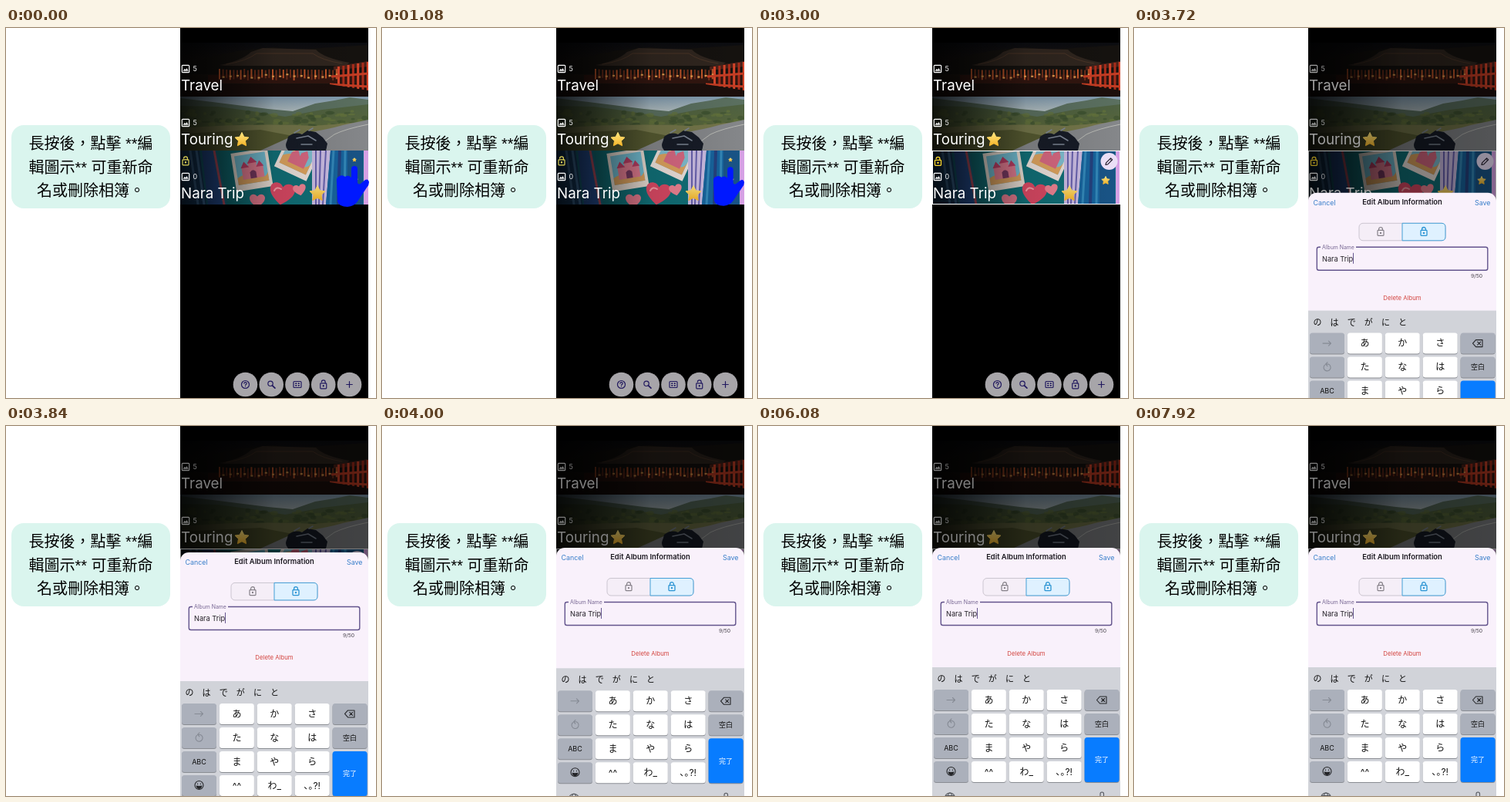
Write an HTML page that moves like this. It is 480 px wide and 480 px high and loops after 8000 ms.

```html
<!DOCTYPE html>
<html lang="zh-Hant">
<head>
<meta charset="utf-8">
<title>Album editing guide</title>
<style>
  html, body { margin: 0; width: 100%; height: 100%; overflow: hidden; background: #fff; }
  svg { display: block; width: 100vw; height: 100vh; }
  text { font-family: Inter, 'Noto Sans CJK JP', sans-serif; }
  .tip { font: 500 20px 'Liberation Sans', 'Noto Sans CJK JP', sans-serif; text-anchor: middle; }
  .mid { text-anchor: middle; }
  .line { fill: none; stroke-linecap: round; stroke-linejoin: round; }
</style>
</head>
<body>
<svg viewBox="0 0 480 480" xmlns="http://www.w3.org/2000/svg">
  <defs>
    <linearGradient id="shade"><stop offset="0" stop-opacity=".82"/><stop offset=".16" stop-opacity=".62"/><stop offset=".5" stop-opacity=".12"/><stop offset="1" stop-opacity="0"/></linearGradient>
    <linearGradient id="night" x2="0" y2="1"><stop offset="0" stop-color="#0b0c10"/><stop offset=".55" stop-color="#211812"/><stop offset="1" stop-color="#120c0a"/></linearGradient>
    <linearGradient id="sky" x2="0" y2="1"><stop offset="0" stop-color="#7f99ad"/><stop offset=".35" stop-color="#c3cbc8"/></linearGradient>
    <linearGradient id="hill" x2="0" y2="1"><stop offset="0" stop-color="#4e6142"/><stop offset="1" stop-color="#626b33"/></linearGradient>
    <linearGradient id="gold" x2="0" y2="1"><stop offset="0" stop-color="#ffe680"/><stop offset="1" stop-color="#f5b52a"/></linearGradient>
    <clipPath id="phone"><rect x="226" width="244" height="480"/></clipPath>
    <clipPath id="c1"><rect x="226" y="19" width="244" height="70"/></clipPath>
    <clipPath id="c2"><rect x="226" y="89" width="244" height="70"/></clipPath>
    <clipPath id="c3"><rect x="226" y="159" width="244" height="70"/></clipPath>
    <path id="heart" d="M0 10C-7 5-12 0-11-5C-10-10-3-11 0-6C3-11 10-10 11-5C12 0 7 5 0 10Z"/>
    <g id="pic" class="line" stroke="#fff" stroke-width="1.2"><rect x="-4.7" y="-4.7" width="9.4" height="9.4" rx="1"/><path d="M-3 2.6L-1.2 .2L.2 1.6L1.6-.6L3.2 2.6Z" fill="#fff" stroke-width=".5"/></g>
    <g id="lock" class="line"><rect x="-4" y="-1.7" width="8" height="7" rx=".8"/><path d="M-2.4-1.7V-3.2A2.4 2.4 0 0 1 2.4-3.2V-1.7"/><circle cy="1.8" r=".6"/></g>
    <g id="unlock" class="line"><rect x="-4" y="-1.7" width="8" height="7" rx=".8"/><path d="M2.4-1.7V-3.2A2.4 2.4 0 0 0-2.4-3.4"/><circle cy="1.8" r=".6"/></g>
  </defs>

  <rect x="7" y="126" width="206" height="108" rx="16" fill="#daf5ee"/>
  <text class="tip" x="110" y="157">長按後，點擊 **編</text>
  <text class="tip" x="110" y="187.5">輯圖示** 可重新命</text>
  <text class="tip" x="110" y="218">名或刪除相簿。</text>

  <g clip-path="url(#phone)">
    <rect x="226" width="244" height="480"/>

    <g clip-path="url(#c1)">
      <rect x="226" y="19" width="244" height="70" fill="url(#night)"/>
      <path d="M226 52L262 38L300 30L345 25L380 28L470 22V60H226Z" fill="#15120f"/>
      <path d="M277 48Q305 43 318 31L333 26L402 28Q412 39 446 45L440 49H284Z" fill="#30261f"/>
      <path d="M286 47Q312 43 325 33H398Q410 42 436 46" class="line" stroke="#4a3527"/>
      <path d="M262 61H470V72H262Z" fill="#321610"/>
      <path d="M425 50L470 43V50L425 55Z" fill="#4b2119"/>
      <g id="shrine"></g>
      <path d="M226 73H420L470 81V89H226Z" fill="#1c0f0c"/>
    </g>

    <g clip-path="url(#c2)">
      <rect x="226" y="89" width="244" height="70" fill="url(#sky)"/>
      <path d="M226 91L268 96L300 100L340 105L372 108L401 98L426 94L446 90L470 93V140H226Z" fill="#5b7060"/>
      <path d="M226 101L275 102L320 108L362 115L410 106L470 99V159H226Z" fill="url(#hill)"/>
      <g id="trees"></g>
      <path d="M226 130Q320 123 400 127L470 121V159H226Z" fill="#74764a"/>
      <path d="M470 119L437 126Q420 131 390 136L300 159H470Z" fill="#85878a"/>
      <path d="M470 125Q440 131 426 138L397 159" class="line" stroke="#b9bab5"/>
      <path d="M226 137L330 132L372 140L330 159H226Z" fill="#565a31"/>
      <g fill="#171c27"><path d="M366 141Q375 134 384 138L391 133L402 135L411 142L417 150L415 159H366L364 149Z"/><circle cx="371" cy="152" r="8"/><circle cx="409" cy="153" r="7"/></g>
      <path d="M374 136L381 132M393 133L398 130M377 143L392 140L402 146M383 151H397" class="line" stroke="#7e8795" stroke-width="1.5"/>
    </g>

    <g clip-path="url(#c3)">
      <rect x="226" y="159" width="244" height="70" fill="#176e86"/>
      <path d="M226 159H251L260 229H226Z" fill="#1d4a77"/>
      <path d="M239 159L249 229M247 159L257 229" class="line" stroke="#4d86bd" stroke-width="3"/>
      <path d="M254 159H268L281 229H262Z" fill="#28549d"/>
      <path d="M270 159L283 229" class="line" stroke="#c35268" stroke-width="3"/>
      <path d="M274 159H402L405 229H287Z" fill="#117078"/>
      <g transform="translate(319 184) rotate(-9)">
        <rect x="-24" y="-25" width="48" height="50" fill="#eadfd5"/><rect x="-20" y="-21" width="40" height="38" fill="#74bfd4"/>
        <path d="M-20 8Q-8 1 4 8T20 6V17H-20Z" fill="#dda35f"/>
        <path d="M-13 11V-5L-9-11L-4-5V-9L1-15L7-9V-4L11-10L15-4V11Z" fill="#e47d92"/>
        <path d="M-14-4L-9-12L-3-4ZM-5-9L1-17L8-9ZM6-3L11-11L16-3Z" fill="#bd3f66"/><path d="M-3 11V3Q1-2 5 3V11Z" fill="#793a62"/>
      </g>
      <g transform="translate(378 169) rotate(25)">
        <rect x="-23" y="-23" width="46" height="45" fill="#eee3dd"/><rect x="-19" y="-19" width="38" height="34" fill="#80bed0"/>
        <path d="M-19 4Q-6-8 5 2T19-2V15H-19Z" fill="#dfa45f"/><path d="M-10 9V-4L-4-11L2-4V-8L8-14L13-7V9Z" fill="#d86982"/><circle cx="-10" cy="-10" r="4" fill="#f2cc70"/>
      </g>
      <g fill="#da4964"><use href="#heart" transform="translate(358 215) rotate(9) scale(1.45)"/><use href="#heart" transform="translate(326 224) scale(.9)" fill="#e47a8d"/><use href="#heart" transform="translate(381 210) rotate(-12) scale(.75)" fill="#ef8393"/></g>
      <path d="M348 211Q351 205 357 209" class="line" stroke="#f6a0a8" stroke-width="2"/>
      <path d="M397 159H421L415 229H397Z" fill="#cabce2"/>
      <path d="M402 159V229M408 159L406 229M415 159L411 229" class="line" stroke="#6760ad" stroke-width="2"/>
      <path d="M421 159H463V229H415Z" fill="#17639c"/>
      <path d="M425 159L421 229M440 159L439 229" class="line" stroke="#3387b7" stroke-width="3"/>
      <path d="M433 159L431 229" class="line" stroke="#24417d" stroke-width="4"/>
      <path d="M443 159H463V229H443Z" fill="#195486"/><path d="M464 159H470V229H464Z" fill="#d6a1e5"/>
      <g id="stars"></g>
    </g>

    <rect x="226" y="19" width="244" height="210" fill="url(#shade)"/>
    <g id="rows"></g>
    <use id="cardLock" href="#unlock" x="233" y="172.5" stroke="#ddd057" stroke-width="1.2"/>
    <g id="selected">
      <use href="#unlock" x="233.5" y="173" stroke="#ffd92e" stroke-width="1.3"/>
      <rect x="226.5" y="159.5" width="243" height="69" fill="none" stroke="#fff"/>
      <circle cx="455.5" cy="173" r="11" fill="#eadff6"/>
      <path d="M451 177.5L451.6 174.8L457.6 168.8L459.7 170.9L453.7 176.9Z" class="line" stroke="#292332" stroke-width="1.2"/>
      <path d="M456.5 169.9L458.6 172" stroke="#292332"/>
    </g>
    <g id="tools"></g>
    <rect id="dim" x="226" width="244" height="480"/>

    <g id="sheet">
      <rect x="226" y="158" width="244" height="360" rx="11" fill="#f9f1fb"/>
      <g fill="#397fca" font-size="8.9"><text x="232.5" y="174">Cancel</text><text x="442" y="174">Save</text></g>
      <text class="mid" x="348" y="173.3" font-size="9.4" font-weight="600" fill="#1c1920">Edit Album Information</text>
      <rect x="292" y="197.5" width="112" height="22.5" rx="5" fill="#f5eef7" stroke="#cbc5d0"/>
      <path d="M348 197.5H399Q404 197.5 404 202.5V215Q404 220 399 220H348Z" fill="#dff1ff" stroke="#459fd5"/>
      <use href="#lock" x="320" y="208.3" stroke="#858088" stroke-width="1.2"/><use href="#lock" x="376" y="208.3" stroke="#2b94d3" stroke-width="1.3"/>
      <rect x="237.3" y="228.5" width="221.5" height="30" rx="2.5" fill="none" stroke="#63548d" stroke-width="1.4"/>
      <rect x="242" y="226" width="46" height="5" fill="#f9f1fb"/>
      <text x="244" y="231.3" font-size="6.9" fill="#786894">Album Name</text>
      <text x="244" y="247" font-size="9.2" fill="#242027">Nara Trip</text>
      <rect x="284" y="236" width="1" height="14" fill="#65558f"/>
      <text x="452" y="268" text-anchor="end" font-size="6.8" fill="#49444d">9/50</text>
      <text class="mid" x="348" y="297.5" font-size="7.8" fill="#d34640">Delete Album</text>
    </g>
    <g id="keyboard"><rect x="226" y="313" width="244" height="190" fill="#d1d3d9"/></g>
  </g>

  <path id="hand" fill="#0018ff" d="M448 183Q448 179 452 179Q456 179 456 183V201Q458 204 461 201L466 197Q470 195 471 200Q471 204 468 207L456 225Q452 231 443 232Q432 232 430 225L429 200Q428 193 433 192Q436 190 440 193Q444 190 448 194Z"/>
</svg>
<script>
const $ = id => document.getElementById(id);
const add = (id, markup) => $(id).insertAdjacentHTML('beforeend', markup);
const clamp = v => Math.max(0, Math.min(1, v));
const ramp = (t, from, to) => clamp((t - from) / (to - from));

let seed = 7;
const rnd = () => (seed = seed * 16807 % 2147483647) / 2147483647;

function star(x, y, r, fill = 'url(#gold)') {
  const pts = Array.from({ length: 10 }, (_, i) => {
    const a = i * Math.PI / 5 - Math.PI / 2, d = i % 2 ? r * .5 : r;
    return `${(x + d * Math.cos(a)).toFixed(1)},${(y + d * Math.sin(a)).toFixed(1)}`;
  });
  return `<polygon points="${pts.join(' ')}" fill="${fill}" stroke="${fill}" stroke-linejoin="round"/>`;
}

// Photo details
for (let i = 0; i < 34; i++) {
  const x = 276 + i * 4.6, y = 53 + rnd() * 2;
  add('shrine', `<rect x="${x}" y="${y}" width="2" height="${9 + rnd() * 5}" fill="${i % 3 ? '#74301b' : '#c5572a'}"/>`);
  if (i % 2) add('shrine', `<rect x="${x}" y="${59 + rnd() * 5}" width="3" height="2" fill="#e7a351"/>`);
}
for (let i = 0; i < 7; i++)
  add('shrine', `<rect x="${430 + i * 6.3}" y="${50 - i}" width="3" height="38" fill="${i % 2 ? '#a92d1b' : '#d6452a'}"/>`);
add('shrine', '<path d="M422 63L470 59M420 73L470 76" stroke="#c43d24" stroke-width="3"/>');
for (let i = 0; i < 100; i++) {
  const x = 228 + rnd() * 240, y = 108 + rnd() * 20;
  add('trees', `<ellipse cx="${x}" cy="${y}" rx="${2 + rnd() * 4}" ry="${1 + rnd() * 2}" fill="${rnd() > .5 ? '#3e5130' : '#66753c'}" opacity=".65"/>`);
}
add('stars', star(404, 215, 10.5) + star(451, 198, 5.5) + star(452, 171, 2.3));

// Album rows
[['Travel', 5, 19], ['Touring', 5, 89], ['Nara Trip', 0, 159]].forEach(([name, count, y]) =>
  add('rows', `<use href="#pic" x="233" y="${y + 34}"/>
    <text x="242.5" y="${y + 37.3}" font-size="9" fill="#eee">${count}</text>
    <text x="227" y="${y + 62}" font-size="18.8" fill="#fff">${name}</text>`));
add('rows', star(306, 145, 9.5));

// Round tool buttons
const icons = [
  '<circle r="5"/><path d="M-1.6-1.3Q-1.3-3 0-2.9Q1.8-2.8 1.6-1.2Q1.4-.3 0 .8M0 2.6V2.7"/>',
  '<circle cx="-1.2" cy="-1.2" r="3.2"/><path d="M1.3 1.3L4.7 4.7" stroke-width="1.7"/>',
  '<rect x="-5" y="-4" width="10" height="8" rx="1"/><path d="M-2.7-1.3H-.8M.8-1.3H2.7M-2.7 1.3H-.8M.8 1.3H2.7" stroke-width="1.8" stroke-linecap="butt"/>',
  '<use href="#unlock"/>',
  '<path d="M-3.8 0H3.8M0-3.8V3.8"/>'
];
icons.forEach((icon, i) => add('tools',
  `<g transform="translate(${310.5 + i * 33.75} 462.5)"><circle r="15.8" fill="#a7a5a9"/><g class="line" stroke="#21195f" stroke-width="1.2">${icon}</g></g>`));

// Keyboard
const label = (x, y, s, size, fill = '#111') =>
  `<text class="mid" x="${x}" y="${y}" font-size="${size}" fill="${fill}">${s}</text>`;
[...'のはでがにと'].forEach((s, i) => add('keyboard', label(238 + i * 22.1, 332, s, 11)));

const keys = [
  ['', 'あ', 'か', 'さ', ''],
  ['', 'た', 'な', 'は', '空白'],
  ['ABC', 'ま', 'や', 'ら', '完了'],
  ['', '^^', 'わ_', '､｡?!', null]
];
keys.forEach((row, r) => row.forEach((s, c) => {
  if (s === null) return;
  const x = 228 + c * 48.9, y = 342 + r * 31, done = s === '完了';
  const side = c === 0 || c === 4;
  const h = done ? 58 : 27, fill = done ? '#087cff' : side ? '#abb0bb' : '#fff';
  const size = side ? 9 : 12;
  add('keyboard', `<rect x="${x}" y="${y + 1}" width="45" height="${h}" rx="3.5" fill="#898c92"/>
    <rect x="${x}" y="${y}" width="45" height="${h}" rx="3.5" fill="${fill}"/>` +
    label(x + 22.5, y + h / 2 + size * .36, s, size, done ? '#fff' : '#111'));
}));
add('keyboard', `<g class="line" stroke="#252629" stroke-width="1.1">
  <path d="M245 355.5H255.5M252.5 352.5L255.5 355.5L252.5 358.5M247.5 383.5A4.5 4.5 0 1 0 252 382.5H249M251 380L248.5 382.5L251 385" stroke="#858a94"/>
  <path d="M439.5 355.5L443.5 351H452V360H443.5ZM445.7 353.5L449.7 357.5M449.7 353.5L445.7 357.5"/>
  <circle cx="250.5" cy="448" r="5.5"/><path d="M247.2 449Q250.5 450 253.8 449Q253 452.4 250.5 452.4Q248 452.4 247.2 449Z" fill="#252629"/><path d="M248.5 446V446.5M252.5 446V446.5"/>
  <g stroke="#55585e"><circle cx="249" cy="482.5" r="6.5"/><ellipse cx="249" cy="482.5" rx="2.7" ry="6.5"/><path d="M243.5 479.5H254.5"/><rect x="444" y="475" width="4.5" height="9" rx="2.2"/></g>
</g>`);

const pulse = [[520, 1], [760, 1.2], [1060, .95], [1320, 1]];
function handScale(t) {
  for (let i = 1; i < pulse.length; i++) {
    const [a, from] = pulse[i - 1], [b, to] = pulse[i];
    if (t < b) return from + (to - from) * (1 - Math.cos(Math.PI * ramp(t, a, b))) / 2;
  }
  return 1;
}

function draw(t) {
  const s = handScale(t);
  const hand = $('hand');
  hand.setAttribute('transform', `translate(449.5 206) scale(${s}) translate(-449.5 -206)`);
  hand.setAttribute('opacity', 1 - ramp(t, 1840, 2240));

  const on = ramp(t, 1840, 2160);
  $('selected').setAttribute('opacity', on);
  $('cardLock').setAttribute('opacity', 1 - on);

  const rise = (distance, time) => distance * (1 - ramp(t, 3540, 3540 + time)) ** 3;
  $('sheet').setAttribute('transform', `translate(0 ${rise(322, 409)})`);
  $('keyboard').setAttribute('transform', `translate(0 ${rise(167, 574)})`);
  $('dim').setAttribute('opacity', .5 * ramp(t, 3540, 3780));
}

const start = performance.now();
function tick() {
  draw((performance.now() - start) % 8000);
  requestAnimationFrame(tick);
}
tick();
</script>
</body>
</html>
```
